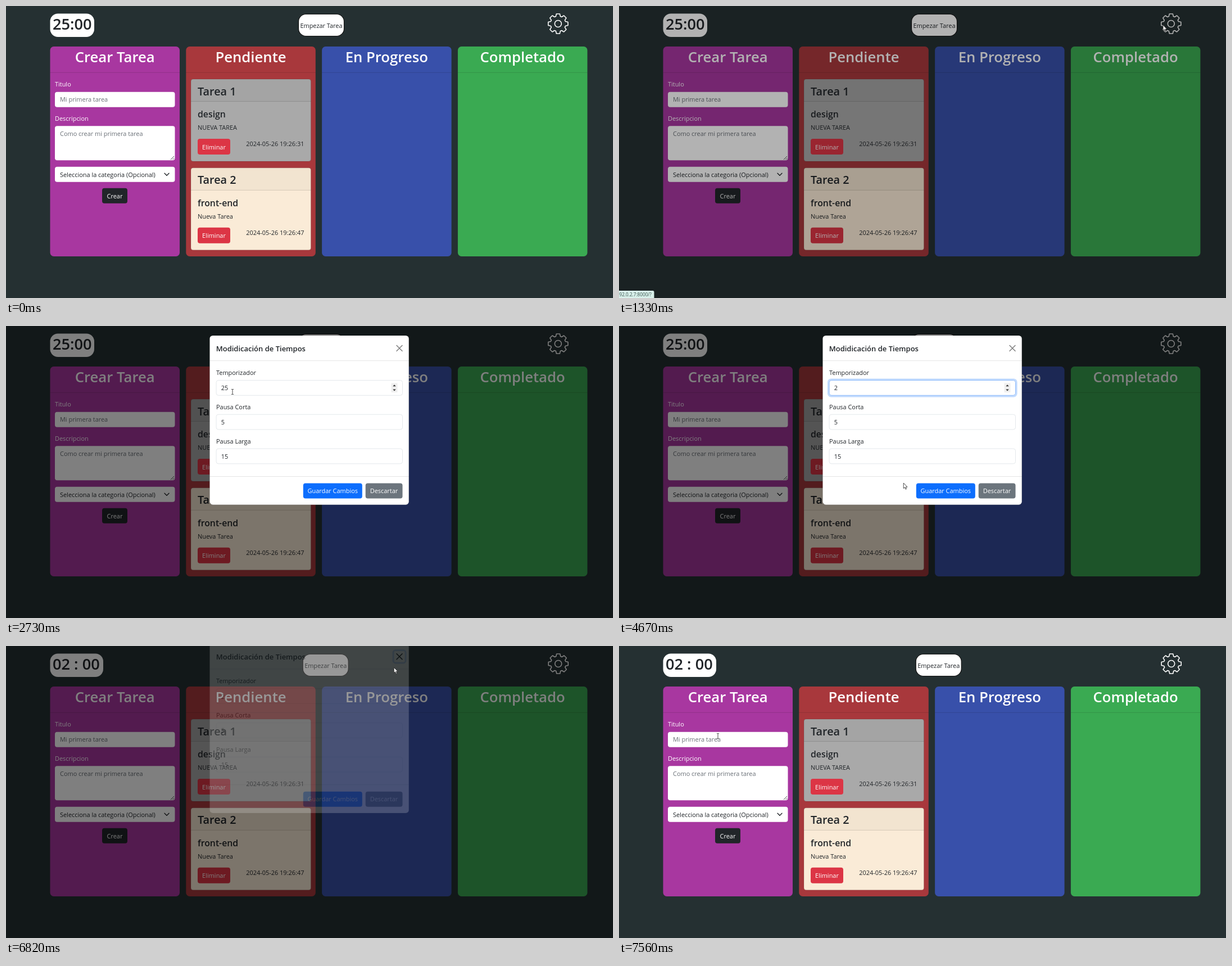
Write an HTML page that moves like this. It is 1080 px wide and 519 px high and loops after 8000 ms.

```html
<!DOCTYPE html>
<html lang="es">
<head>
<meta charset="utf-8">
<title>Tablero de tareas</title>
<style>
html, body { margin: 0; height: 100%; overflow: hidden; background: #253032; }
svg { display: block; width: 100vw; height: 100vh; }
text { font: 10.93px "Open Sans", "Noto Sans", sans-serif; fill: #212529; white-space: pre; }
.h1 { font-size: 25.7px; font-weight: 600; }
.h2 { font-size: 19.8px; font-weight: 600; }
.h4 { font-size: 15.8px; font-weight: 600; }
.h5 { font-size: 13px; font-weight: 600; }
.clock { font-size: 27.2px; font-weight: 600; }
.white { fill: #fff; }
.hint { fill: #6a7077; }
.mid { text-anchor: middle; }
.small { font-size: 8.2px; fill: #3c5550; }
.line { fill: none; stroke: #212529; }
</style>
</head>
<body>
<svg id="stage" viewBox="0 0 1080 519" preserveAspectRatio="none"></svg>
<script>
const LOOP = 8000;
const stage = document.getElementById('stage');

const text = (x, y, str, cls = '', id = '') => `<text x="${x}" y="${y}" class="${cls}" id="${id}">${str}</text>`;
const box = (x, y, w, h, r, fill, more = '') =>
  `<rect x="${x}" y="${y}" width="${w}" height="${h}" rx="${r}" fill="${fill}" ${more}/>`;
const rule = (x, y, w, alpha = .18) => box(x, y, w, .8, 0, `rgba(0,0,0,${alpha})`);
const edge = 'stroke="rgba(0,0,0,.18)" stroke-width=".75"';

function column(i, title, color) {
  const x = 78.5 + i * 241.8;
  return box(x, 72, 230.5, 373, 6.5, color) + rule(x, 117.8, 230.5) +
    text(x + 115.2, 100, title, 'h1 white mid');
}

function task(y, n, color, kind, note, date) {
  return box(329, y, 213.5, 146, 4, color, edge) +
    `<path d="M329 ${y + 39.5}v-35.5q0-4 4-4h205.500q4 0 4 4v35.500z" fill="rgba(0,0,0,.03)"/>` +
    rule(329, y + 39.2, 213.5) +
    text(341, y + 28.5, 'Tarea ' + n, 'h2') + text(341, y + 68, kind, 'h4') +
    text(341, y + 90.2, note) +
    box(341, y + 106, 58, 28, 4, '#dc3545') + text(370, y + 124.6, 'Eliminar', 'white mid') +
    text(427.3, y + 118.8, date);
}

function gear(cx, cy) {
  const points = [];
  for (let tooth = 0; tooth < 8; tooth++) {
    for (const [offset, r] of [[-.3, 13.6], [-.17, 17.8], [.17, 17.8], [.3, 13.6]]) {
      const a = tooth * Math.PI / 4 + offset;
      points.push((cx + r * Math.cos(a)).toFixed(2) + ' ' + (cy + r * Math.sin(a)).toFixed(2));
    }
  }
  return `<g id="gear" fill="none" stroke="#fff" stroke-width="1.6" stroke-linejoin="round">
    <path d="M${points.join('L')}z"/><circle cx="${cx}" cy="${cy}" r="6"/></g>`;
}

const form = text(87, 143, 'Titulo', 'white') + box(87, 152.700, 213.500, 27, 4, '#fff') +
  text(96, 170.3, 'Mi primera tarea', 'hint') +
  text(87, 204, 'Descripcion', 'white') + box(87, 213.3, 213.500, 61, 4, '#fff') +
  text(96, 231.3, 'Como crear mi primera tarea', 'hint') +
  '<path class="line" stroke-width=".8" d="M293 273l6-6M296.500 273l2.500-2.500"/>' +
  box(87, 285.800, 213.500, 27, 4, '#fff') + text(96, 303.500, 'Selecciona la categoria (Opcional)') +
  '<path class="line" stroke-width="1.4" stroke-linecap="round" stroke-linejoin="round" d="M282 297.300l4 4 4-4"/>' +
  box(171, 323.800, 45, 27, 4, '#212529') + text(193.500, 341.700, 'Crear', 'white mid');

const board = box(0, 0, 1080, 519, 0, '#253032') +
  box(78.5, 13.5, 78.5, 41.5, 14, '#fff', 'id="pill"') + text(83, 42, '', 'clock', 'clock') +
  `<g id="start">${box(520.5, 14.5, 81, 39, 13, '#fff', 'stroke="#111" stroke-width="1.2"')}
    ${text(561, 38.600, 'Empezar Tarea', 'mid')}</g>` + gear(982.3, 31.5) +
  column(0, 'Crear Tarea', '#a837a0') + column(1, 'Pendiente', '#a8383c') +
  column(2, 'En Progreso', '#3850aa') + column(3, 'Completado', '#3aaa52') + form +
  task(130, 1, '#a9a9a9', 'design', 'NUEVA TAREA', '2024-05-26 19:26:31') +
  task(287.700, 2, '#faebd7', 'front-end', 'Nueva Tarea', '2024-05-26 19:26:47');

const field = (y, label, value, id) => text(374, y - 9.500, label) +
  box(374, y, 331.500, 26.800, 4, '#fff', 'stroke="#dee2e6" stroke-width=".8"') +
  text(382.700, y + 17.8, value, '', id);

const modal = `<g id="modal">` + box(362.4, 17, 354.400, 300.700, 5.5, '#fff', edge) +
  text(373.700, 44.800, 'Modidicación de Tiempos', 'h5') +
  '<path id="cross" stroke="#000" stroke-width="1.5" stroke-linecap="round" d="M695 34.500l10 10m0-10l-10 10"/>' +
  box(689, 28.300, 22, 22.500, 4, 'none', 'id="crossRing" stroke="#0d6efd" stroke-opacity=".3" stroke-width="2.8"') +
  rule(362.4, 61.300, 354.400, .13) + rule(362.4, 267, 354.400, .13) +
  field(96.500, 'Temporizador', '', 'minutes') + field(157.200, 'Pausa Corta', '5') + field(218, 'Pausa Larga', '15') +
  `<g id="ring" fill="none">${box(372.300, 94.800, 334.900, 30.200, 5, 'none', 'stroke="#c2dbfe" stroke-width="2.8"')}
    ${box(374, 96.500, 331.500, 26.800, 4, 'none', 'stroke="#86b7fe" stroke-width=".9"')}</g>` +
  `<g id="spinner">${box(685.500, 101.500, 11, 16.500, 0, '#efefef')}
    <path fill="#333" d="M688.300 107.300h5.400l-2.700-3zM688.300 112.500h5.400l-2.700 3z"/></g>` +
  box(0, 101.300, .9, 15.700, 0, '#212529', 'id="caret"') +
  box(528.800, 279.400, 105, 27, 4, '#0d6efd', 'id="save"') + text(581.3, 297.200, 'Guardar Cambios', 'white mid') +
  box(639.700, 279.400, 65.800, 27, 4, '#6c757d') + text(672.500, 297.200, 'Descartar', 'white mid') + '</g>';

const status = `<g id="status"><path d="M0 506h60q2.500 0 2.500 2.500V519H0z" fill="#d8f0ea"/>
  ${text(.5, 515.800, '92.0.2.7:8000/?', 'small')}</g>`;

const pointers = `<g id="arrow"><path d="M0 0v9.600l2.200-2 1.500 3.500 1.600-.700-1.500-3.300h3z" fill="#fff" stroke="#222" stroke-width=".8"/></g>
  <g id="hand"><path d="M-1 .8q1-1.500 2 0v4l4 1q1 .5.700 2l-1 4h-5l-3.200-4.500q.3-1.400 2.500 0z" fill="#fff" stroke="#222" stroke-width=".8"/></g>
  <g id="beam"><path d="M-2-4.500h1.500l.5.500.5-.500H2M0-4V4M-2 4.500h1.500L0 4l.5.500H2" fill="none" stroke="#333" stroke-width=".9"/></g>`;

stage.innerHTML = board + box(0, 0, 1080, 519, 0, '#000', 'id="shade"') + modal + status + pointers;
const el = {};
stage.querySelectorAll('[id]').forEach(node => { if (node.id) el[node.id] = node; });

// Pointer path: time, x, y
const path = [
  [190, 1050, 517], [500, 1022, 240], [780, 978, 55], [920, 968, 34], [1400, 968, 34],
  [1860, 888, 86], [2070, 827, 112], [2270, 668, 117], [2470, 520, 155], [2730, 403, 117],
  [4210, 403, 117], [4450, 450, 210], [4670, 506, 279], [4900, 558, 292], [5010, 570, 299],
  [5280, 570, 299], [5350, 560, 294], [5830, 560, 294], [6050, 630, 160], [6290, 697, 40],
  [6620, 697, 40], [6700, 691, 38], [6820, 691, 38], [7100, 480, 85], [7350, 240, 150], [7560, 176, 160]
];
// Pointer shape from each time on
const shapes = [[0, ''], [190, 'arrow'], [800, 'hand'], [1240, 'arrow'], [2230, 'beam'], [2370, 'arrow'],
  [2440, 'beam'], [2530, 'arrow'], [2640, 'beam'], [4250, 'arrow'], [4800, 'hand'], [5920, 'arrow'],
  [6250, 'hand'], [6700, 'arrow'], [7480, 'beam']];

const ramp = (t, start, length = 150) => Math.min(1, Math.max(0, (t - start) / length));
const easeOut = p => 1 - (1 - p) ** 1.7;
const within = (t, a, b) => t >= a && t < b;
const show = (node, on) => node.setAttribute('visibility', on ? 'visible' : 'hidden');
const shift = (node, x, y) => node.setAttribute('transform', `translate(${x} ${y})`);

function pointerAt(t) {
  const next = path.findIndex(p => p[0] > t);
  if (next < 0) return path[path.length - 1].slice(1);
  if (next === 0) return path[0].slice(1);
  const [t0, x0, y0] = path[next - 1], [t1, x1, y1] = path[next];
  const p = (t - t0) / (t1 - t0);
  return [x0 + (x1 - x0) * p, y0 + (y1 - y0) * p];
}

function draw(t) {
  const saved = t >= 5080;
  el.clock.textContent = saved ? '02 : 00' : '25:00';
  el.pill.setAttribute('width', saved ? 94.500 : 78.500);
  shift(el.start, saved ? 7.700 : 0, 0);
  shift(el.gear, saved ? .4 : 0, 0);

  el.shade.setAttribute('opacity', .5 * (ramp(t, 1240) - ramp(t, 7000)));
  el.modal.setAttribute('opacity', ramp(t, 1390) - ramp(t, 6700));
  shift(el.modal, 0, -35.500 * (1 - easeOut(ramp(t, 1390, 300)) + easeOut(ramp(t, 6700, 300))));

  el.minutes.textContent = t < 3600 ? '25' : '2';
  el.ring.setAttribute('opacity', ramp(t, 2780) - ramp(t, 5040));
  show(el.spinner, within(t, 2230, 2370) || within(t, 2640, 5080));
  show(el.caret, within(t, 2800, 3340) || within(t, 3870, 4370) || within(t, 4870, 5040));
  el.caret.setAttribute('x', t < 3600 ? 395 : 388.300);

  const hover = ramp(t, 4800) - ramp(t, 5920);
  const mix = (a, b) => Math.round(a + (b - a) * hover);
  el.save.setAttribute('fill', `rgb(${mix(13, 11)},${mix(110, 94)},${mix(253, 215)})`);
  el.cross.setAttribute('opacity', t < 6250 ? .5 : t < 6560 ? .75 : 1);
  show(el.crossRing, t >= 6560);
  show(el.status, within(t, 1120, 1790));

  const shape = shapes.filter(s => s[0] <= t).pop()[1];
  const [x, y] = pointerAt(t);
  for (const name of ['arrow', 'hand', 'beam']) {
    show(el[name], name === shape);
    shift(el[name], x, y);
  }
}

function tick() {
  draw(performance.now() % LOOP);
  requestAnimationFrame(tick);
}
tick();
</script>
</body>
</html>
```
